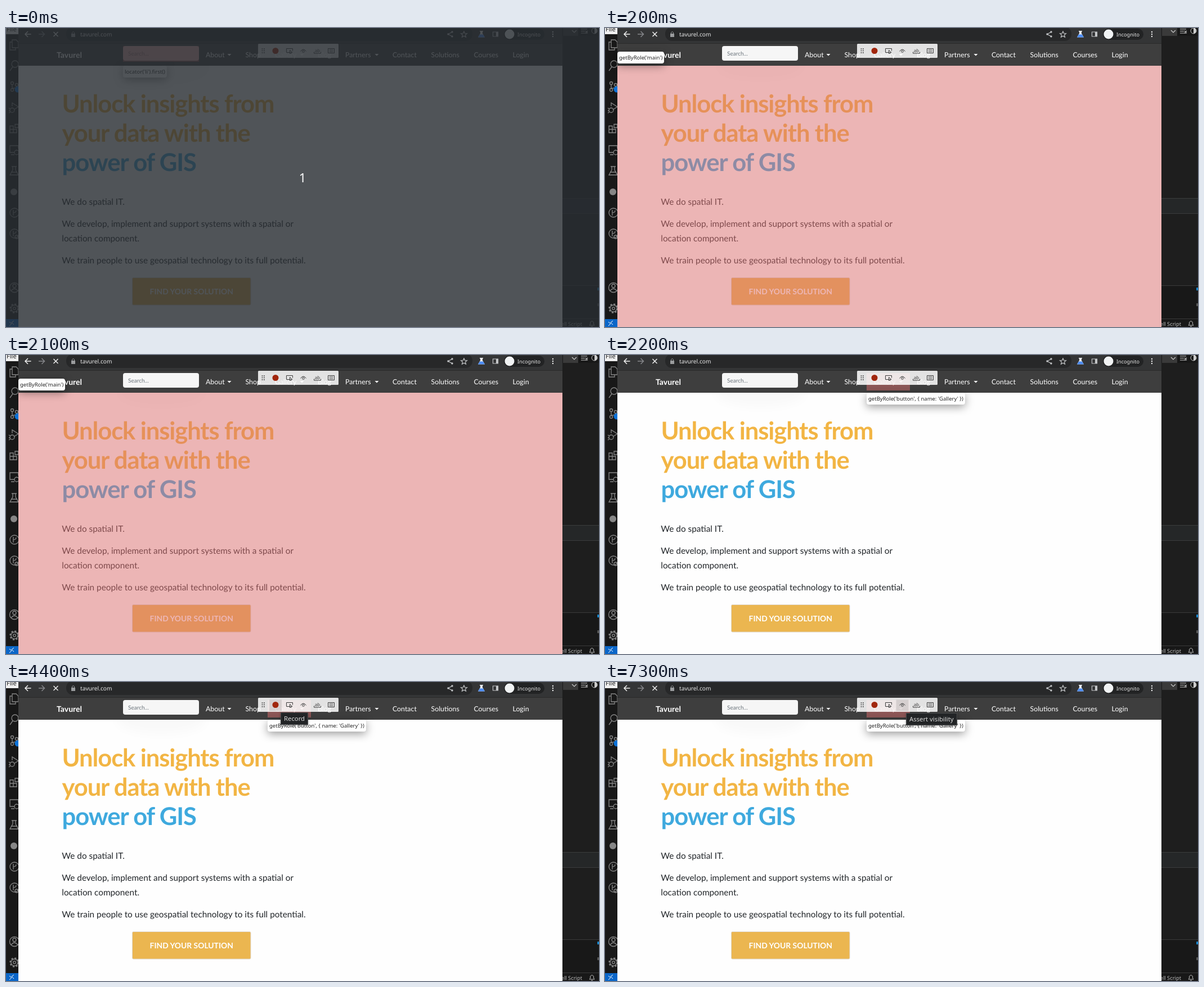
An HTML page that plays this animation: 1054 by 531 pixels, repeating every 8 s.

```html
<!DOCTYPE html>
<html lang="en">
<head>
<meta charset="utf-8">
<title>Locator picker</title>
<style>
  html, body { margin: 0; width: 1054px; height: 531px; overflow: hidden; background: #1e1e1e; }
  svg, div { position: absolute; }
  svg { left: 0; top: 0; }
  text { white-space: pre; text-rendering: geometricPrecision; }
  .site { font-family: Lato, sans-serif; }
  .ui, .tip, .hint { font-family: "Noto Sans", sans-serif; }
  .line { fill: none; stroke: #868686; stroke-width: 1.3; }
  .tool { fill: none; stroke: #3b3b3b; stroke-width: 1; }
  .tip, .hint { white-space: pre; box-sizing: border-box; }
  .tip { height: 21px; padding: 0 3px; border-radius: 4px; background: #fff; color: #222;
    font-size: 9.5px; line-height: 21px; box-shadow: 0 4px 16px rgba(0,0,0,.4); }
  .hint { height: 22px; padding: 0 5px; border: 1px solid #4a4c4e; background: #222426; color: #dcdcdc;
    font-size: 11.3px; line-height: 20px; box-shadow: 0 1px 4px rgba(0,0,0,.3); }
  #veil { inset: 0; background: rgba(40,45,50,.81); color: #fff; text-align: center;
    font: 22px/531px "Noto Sans", sans-serif; }
</style>
</head>
<body>
<svg width="1054" height="531" viewBox="0 0 1054 531">
  <defs>
    <filter id="soft" x="-50%" y="-100%" width="200%" height="300%"><feGaussianBlur stdDeviation="10"/></filter>
    <clipPath id="page"><path d="M22 67H989V531H22Z"/></clipPath>
  </defs>

  <!-- editor behind the browser -->
  <path fill="#1e1e1e" d="M0 0H1054V531H0Z"/>
  <path fill="#181818" d="M0 0H22V531H0ZM989 0H1054V14H989ZM989 458H1054V531H989Z"/>
  <path fill="#f0f0f0" d="M0 0H22V11H0Z"/>
  <text class="ui" x="1" y="6" font-size="11" fill="#222">File</text>
  <path fill="#0a66c8" d="M0 517H22V531H0Z"/>
  <path fill="none" stroke="#fff" d="M6 522l4 3-4 4M14 520l-4 3 4 4"/>
  <g class="line">
    <path d="M11 21h7l4 4v10H11ZM11 25H7v14h10v-4"/>
    <circle cx="16" cy="64" r="6"/><path d="M12 69l-5 7"/>
    <circle cx="11" cy="98" r="2.5"/><circle cx="11" cy="110" r="2.5"/><circle cx="19" cy="101" r="2.5"/>
    <path d="M11 101v6M19 104q0 3-8 3"/>
    <path d="M11 139v-6l11 7-8 5"/><circle cx="11" cy="146" r="4"/><path d="M5 142l3 2M5 147h2M5 151l3-2"/>
    <path d="M7 174h6v12H7ZM7 180h12v6H7ZM16 171h6v6h-6Z"/>
    <path d="M15 221H7V209h15v5M9 225h6"/><circle cx="19" cy="221" r="4"/>
    <path d="M10 246h9M12 246v6l-5 9h15l-5-9v-6M9 256h11"/>
    <circle cx="15" cy="328" r="8"/><path d="M13 323v10M13 328q5 0 5-4"/>
    <circle cx="15" cy="365" r="8"/><path d="M13 360v10M13 365q5 0 5-4"/><circle cx="19" cy="371" r="3"/>
    <circle cx="15" cy="461" r="8.5"/><circle cx="15" cy="458" r="3"/><path d="M9 467q6-8 12 0"/>
    <circle cx="15" cy="498" r="6"/><circle cx="15" cy="498" r="2.3"/>
    <circle cx="15" cy="498" r="7.5" stroke-width="2.4" stroke-dasharray="3 2.9"/>
  </g>
  <circle cx="14" cy="291" r="6" fill="#868686"/>
  <circle cx="21" cy="109" r="5.5" fill="#0a72d8"/>

  <path fill="#3a3a3a" d="M990 0h27v14h-27Z"/>
  <path fill="none" stroke="#ccc" stroke-width="1.2" d="M1006 4l4 4 4-4M1022 2h11M1022 5.500h7M1022 9h11M1030 5l4 4m0-4l-4 4"/>
  <circle cx="1046" cy="5" r="5" fill="none" stroke="#ccc"/>
  <path fill="#ccc" d="M1046 0a5 5 0 0 1 0 10Z"/>
  <path fill="#252728" stroke="#3a3c3d" d="M988 302.500H1056V329.500H988Z"/>
  <path stroke="#3a3a3a" d="M989 457.500H1054M989 516.500H1054"/>
  <path fill="#1683c9" d="M1051 461h3v5h-3Z"/><path fill="#555" d="M1051 489h3v5h-3Z"/>
  <text class="ui" x="1024" y="529" font-size="9.300" fill="#bbb" text-anchor="end">Shell Script</text>
  <path fill="none" stroke="#bbb" d="M1037 528h9l-1.500-2v-3q-3-5-6 0v3ZM1040 530h3"/>

  <!-- browser bar -->
  <path fill="#343536" d="M22 0H989V28H22Z"/>
  <rect x="107" y="-2" width="722" height="25" rx="12" fill="#272829"/>
  <rect x="885" y="1" width="72" height="20" rx="10" fill="#222324"/>
  <g fill="none" stroke="#eee" stroke-width="1.500">
    <path d="M44.500 11H34M39 6l-5 5 5 5"/>
    <path stroke="#85878a" d="M58 11h10.500M63.500 6l5 5-5 5"/>
    <path d="M84.500 7l8 8m0-8l-8 8"/>
  </g>
  <path fill="#9a9c9e" d="M116 10h7v6h-7Z"/><path fill="none" stroke="#9a9c9e" d="M117.500 10V8q2-3 4 0v2"/>
  <g fill="none" stroke="#c4c6c8" stroke-width="1.200">
    <path d="M793 7l-7 4 7 4"/>
    <path d="M814 6l1.500 3.500 4 .3-3 2.500 1 4-3.500-2-3.500 2 1-4-3-2.500 4-.3Z"/>
    <path d="M865.500 7h9v8h-9Z"/>
  </g>
  <g fill="#c4c6c8"><circle cx="793" cy="7" r="1.700"/><circle cx="786" cy="11" r="1.700"/><circle cx="793" cy="15" r="1.700"/>
    <path d="M871 7h4v8h-4Z"/></g>
  <path fill="#e8eaed" d="M842 5h6v1.500h-1v3l4 7h-12l4-7v-3h-1Z"/>
  <path fill="#4c8df6" d="M842 11.500h6l3 5h-12Z"/>
  <circle cx="895" cy="11" r="8.500" fill="#f1f3f4"/>
  <g fill="#eee"><circle cx="972" cy="7" r="1.200"/><circle cx="972" cy="11" r="1.200"/><circle cx="972" cy="15" r="1.200"/></g>
  <g class="ui" fill="#e8e8e8">
    <text x="132" y="14.600" font-size="10.200">tavurel.com</text>
    <text x="909" y="14.500" font-size="9.100">Incognito</text>
  </g>

  <!-- web page -->
  <path fill="#fefefe" d="M22 67H989V531H22Z"/>
  <g clip-path="url(#page)"><ellipse cx="276" cy="68" rx="80" ry="24" fill="#000" opacity=".018" filter="url(#soft)"/></g>
  <path fill="#3e3e3e" d="M22 28H989V67H22Z"/>
  <path stroke="#2a2a2a" d="M22 27.500H989"/>
  <rect x="208" y="32" width="135" height="26" rx="4" fill="#f6f6f6"/>
  <g class="site">
    <text x="217" y="48.500" font-size="10.100" fill="#6c757d">Search...</text>
    <text x="90" y="52.500" font-size="14" font-weight="700" fill="#fff">Tavurel</text>
    <g id="nav" font-size="12.350" fill="#fff"></g>
    <g font-size="43.570" font-weight="700" letter-spacing="-1.090" fill="#f2b544">
      <text x="99.500" y="150">Unlock insights from</text>
      <text x="99.500" y="202">your data with the</text>
      <text x="99.500" y="254" fill="#3ea9de">power of GIS</text>
    </g>
    <g font-size="15.340" fill="#212529">
      <text x="99.300" y="313.500">We do spatial IT.</text>
      <text x="99.300" y="352.500">We develop, implement and support systems with a spatial or</text>
      <text x="99.300" y="378.500">location component.</text>
      <text x="99.300" y="417.500">We train people to use geospatial technology to its full potential.</text>
    </g>
    <rect x="224.500" y="443.500" width="210.500" height="48.500" rx="2" fill="#ebb650" stroke="#e0d9cf"/>
    <text x="329.700" y="472.500" font-size="13.850" font-weight="700" fill="#fff" text-anchor="middle">FIND YOUR SOLUTION</text>
  </g>
  <rect id="mark" fill="#dc6f6f" fill-opacity=".5"/>

  <!-- recorder toolbar -->
  <rect x="448" y="28" width="143" height="25" rx="1.500" fill="#fff" fill-opacity=".85"/>
  <rect id="hover" y="31.500" width="22" height="20" fill="#000" fill-opacity=".1"/>
  <path stroke="#444" stroke-width="1.700" stroke-dasharray="1.700 1.700" d="M455.500 36.200v8.500M458.900 36.200v8.500"/>
  <circle cx="479" cy="40.500" r="5.500" fill="#a1260d"/>
  <g class="tool">
    <path d="M504 43.500h-5.500v-7h11v4M504.500 39.500v6l1.500-1.500 1.300 2M504.500 39.500l4.500 4h-3"/>
    <path d="M523.500 41.500q5-7 10 0"/><circle cx="528.500" cy="41.500" r="1.800"/>
    <path d="M547.500 42.500v2.500h12v-2.500"/>
    <path d="M572.500 36.500h11v8h-11ZM574.500 39h7M574.500 42h7"/>
  </g>
  <text class="ui" x="553.500" y="42.500" font-size="8" fill="#3b3b3b" text-anchor="middle">ab</text>
</svg>
<div class="tip" id="tip"></div>
<div class="hint" id="hint"></div>
<div id="veil">1</div>

<script>
const LOOP = 8000;
const $ = id => document.getElementById(id);

const links = [[355, 'About', 397], [425.5, 'Shop'], [478, 'Gallery', 526], [554, 'Blog'],
  [603, 'Partners', 659], [687, 'Contact'], [755.500, 'Solutions'], [831.500, 'Courses'], [900.500, 'Login']];
$('nav').innerHTML = links.map(([x, label, caret]) =>
  `<text x="${x}" y="52">${label}</text>` +
  (caret ? `<path d="M${caret - 3.500} 46h7l-3.500 3.500Z"/>` : '')).join('');

// highlight box, tip position, locator
const main = [[22, 67, 967, 464], [22, 42], "getByRole('main')"];
const search = [[208, 32, 135, 28], [208, 67], "locator('li').first()"];
const navigation = [[22, 28, 967, 39], [22, 70.500], "getByRole('navigation')"];
const welcome = [[22, 82, 967, 449], [22, 57.500],
  "locator('#welcome div').filter({ hasText: 'Unlock insights from your' }).first()"];
const gallery = [[465, 32, 77, 31], [465, 67], "getByRole('button', { name: 'Gallery' })"];

// the pointer leaves the welcome block through main on its way up to the toolbar
const picks = [[0, search], [100, navigation], [200, main], [1900, welcome], [2100, main], [2200, gallery]];

// start, left edge of the hovered button
const hovers = [[0, null], [2300, 493], [3800, 468], [5500, 493], [6800, 517.500]];

// start, hint position, label
const hints = [
  [0], [2900, [513, 57], 'Pick locator'], [3800],
  [4400, [488, 54], 'Record'], [5500],
  [6400, [510, 56], 'Pick locator'], [6800],
  [7300, [535, 55], 'Assert visibility']
];

const at = (steps, t) => steps.findLast(step => step[0] <= t);
const show = (el, on) => { el.style.display = on ? '' : 'none'; };

function label(el, pos, text) {
  show(el, text);
  if (!text) return;
  el.style.left = pos[0] + 'px';
  el.style.top = pos[1] + 'px';
  el.textContent = text;
}

function draw(now) {
  const t = now % LOOP;
  const [box, tipPos, locator] = at(picks, t)[1];
  ['x', 'y', 'width', 'height'].forEach((name, i) => $('mark').setAttribute(name, box[i]));
  label($('tip'), tipPos, locator);

  const [, left] = at(hovers, t);
  show($('hover'), left);
  if (left) $('hover').setAttribute('x', left);

  const [, hintPos, hint] = at(hints, t);
  label($('hint'), hintPos, hint);
  show($('veil'), t < 100);
}

let start;
function tick(now) {
  start ??= now;
  draw(now - start);
  requestAnimationFrame(tick);
}
draw(0);
requestAnimationFrame(tick);
</script>
</body>
</html>
```
